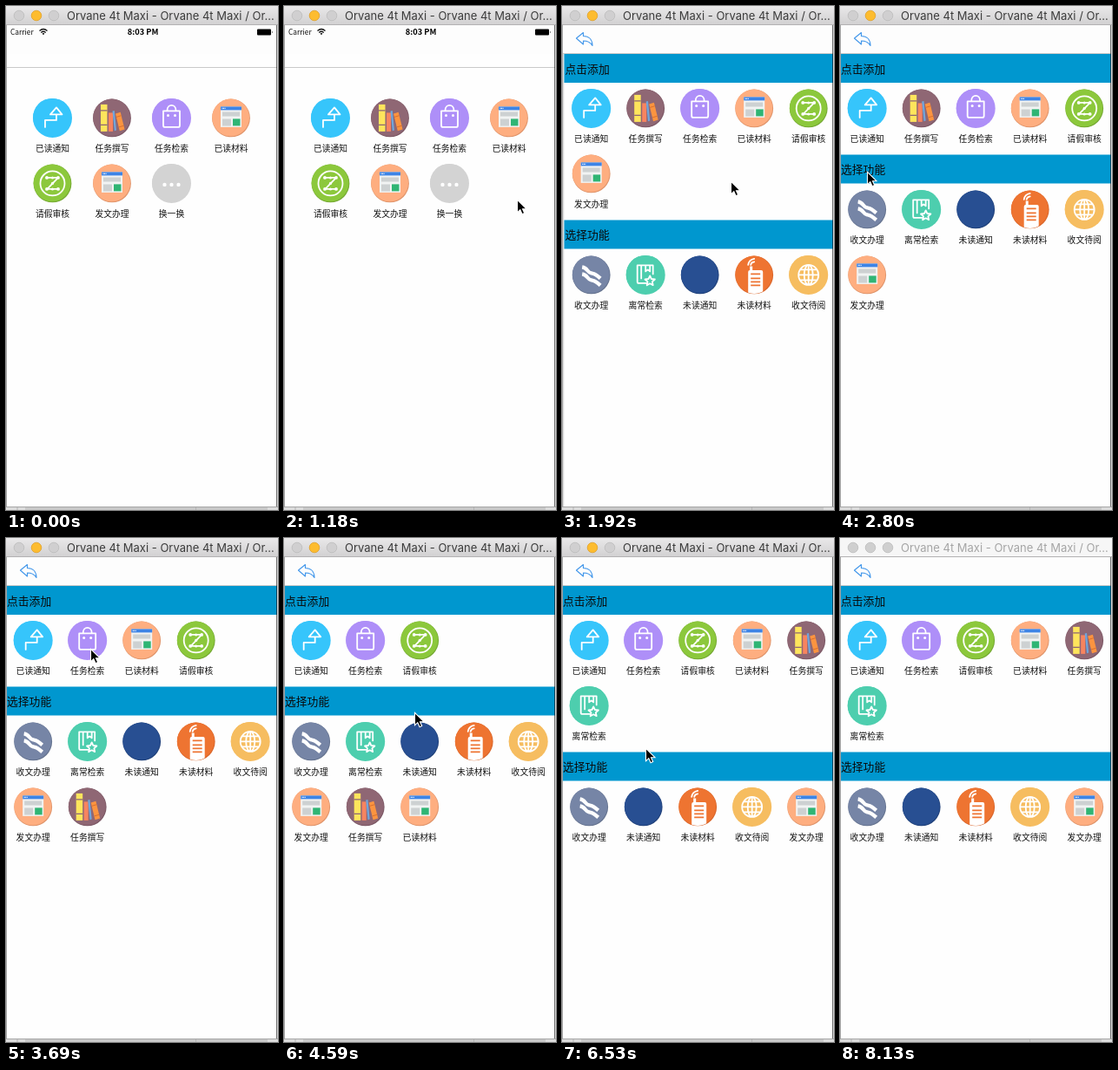
These frames come from a looping animation (313x578 px, 8230 ms). An HTML page:

```html
<!DOCTYPE html>
<html lang="zh">
<head>
<meta charset="utf-8">
<title>Menu editor</title>
<style>
html, body { margin: 0; width: 100%; height: 100%; overflow: hidden; background: #fff; }
svg { display: block; }
text { font-family: "Noto Sans CJK SC", "Noto Sans CJK", sans-serif; }
.ui { font-family: Inter, sans-serif; }
.label { font-size: 9.8px; text-anchor: middle; fill: #111; }
.head { font-size: 12.8px; fill: #0a0a0a; }
.ln { fill: none; stroke: #fff; stroke-width: 1.8; stroke-linejoin: round; stroke-linecap: round; }
.w { fill: #fff; }
</style>
</head>
<body>
<svg width="313" height="578" viewBox="0 0 313 578">
  <defs>
    <linearGradient id="active" x2="0" y2="1"><stop stop-color="#e9e8e9"/><stop offset="1" stop-color="#d1d0d1"/></linearGradient>
    <linearGradient id="edge"><stop stop-color="#000" stop-opacity="0"/><stop offset="1" stop-color="#000" stop-opacity=".16"/></linearGradient>
    <clipPath id="win"><rect x="1" y="22" width="311" height="552"/></clipPath>
    <clipPath id="disc"><circle r="21.500"/></clipPath>

    <g id="arrow"><path class="ln" d="M-8.500 10.500V2.500H4.500V-4H-2.500L4.500-12L11-4H4.500"/></g>
    <g id="books">
      <path d="M-13-15.500h7.500v31h-7.500z" fill="#fee55c"/>
      <path d="M-13-8.500h7.500M-13 8h7.500" stroke="#8c6573" stroke-width="1.400"/>
      <path d="M-4-6h5v21.500h-5z" fill="#f7845f"/>
      <path d="M.5-8l2.300-.5L5 14l-2.200.8z" fill="#6fa5dc"/>
      <path d="M4-5l5.700-1.700L14.500 13l-5.700 1.900z" fill="#fb9440"/>
      <path d="M4.900-1l5.700-1.700M7.900 10.500l5.700-1.700" stroke="#d9702f"/>
    </g>
    <g id="bag">
      <path class="ln" d="M-9.500-8h19v16.500q0 2-2 2h-15q-2 0-2-2zM-5-8.500c0-8 10-8 10 0"/>
      <circle class="w" cx="-4" cy="-3" r="1.500"/><circle class="w" cx="4" cy="-3" r="1.500"/>
    </g>
    <g id="browser">
      <path d="M-12-13h24v23.500h-24z" fill="#f1f3f3"/>
      <path d="M-12-13h24v4h-24z" fill="#3d84e6"/>
      <path d="M-10.500-11h4" stroke="#fff" stroke-width="1.200" stroke-dasharray="1 .6"/>
      <path d="M-10-7h20v5h-20zM-10 1h10v8h-10z" fill="#cdd1d2"/>
      <path d="M2 1h8.500v8h-8.500z" fill="#2fb574"/>
    </g>
    <g id="net">
      <circle class="ln" r="14"/>
      <path class="ln" d="M-7-6.500H6.500L-6 6.500H7"/>
      <g class="w"><circle cx="-6.500" cy="-6.500" r="1.900"/><circle cy="-6.500" r="1.500"/><circle cx="6.500" cy="-6.500" r="1.900"/>
      <circle cx="-6.500" cy="6.500" r="1.900"/><circle cy="6.500" r="1.500"/><circle cx="6.500" cy="6.500" r="1.900"/><circle r="1.600"/></g>
    </g>
    <g id="more" class="w"><circle cx="-8" cy="1.500" r="2.200"/><circle cy="1.500" r="2.200"/><circle cx="8" cy="1.500" r="2.200"/></g>
    <g id="waves" fill="none" stroke="#fff" stroke-width="4.200">
      <path id="wave" d="M-10.500-9C-4-8-5-3 0-2C4-1 5-1 10.500 4"/>
      <use href="#wave" y="8"/>
    </g>
    <g id="mark">
      <path class="ln" d="M1 9.500H-8q-1.500 0-1.500-2V-11H8.500V-1M-5-11V4M0-11V-4L2.500-6L5-4V-11"/>
      <path class="ln" stroke-width="1.500" d="M5 1l1.700 3.600 4 .5-3 2.700.8 4L5 9.900l-3.500 1.900.8-4-3-2.700 4-.5z"/>
    </g>
    <g id="plain"></g>
    <g id="radio" clip-path="url(#disc)">
      <path class="w" d="M-7-3.500q0-2 2-2V-10h3v4.500H8q2 0 2 2V23H-7z"/>
      <path class="ln" stroke-width="1.500" d="M-7-11.500q1-6 7-7M-4-11.500q.5-3 4-3.500"/>
      <path d="M-4-1H7M-4 4H7M-4 8H7M-4 12H7" stroke="#ee7331" stroke-width="1.700"/>
    </g>
    <g id="globe"><path class="ln" stroke-width="1.500" d="M-11.500 0a11.500 11.500 0 1 0 23 0a11.500 11.500 0 1 0-23 0zM-5 0a5 11.500 0 1 0 10 0a5 11.500 0 1 0-10 0zM0-11.500V11.500M-11.500 0H11.500M-9.800-6H9.800M-9.800 6H9.800"/></g>
  </defs>

  <rect width="313" height="578" fill="#dcdcdc"/>
  <rect x="22" y="574" width="279" height="4" fill="#c9c9c9"/>
  <path d="M0 574.500H313" stroke="#a6a6a6"/>
  <path d="M13 575v3M218.500 575v3" stroke="#b4b4b4"/>
  <rect x="1" y="22" width="311" height="552" fill="#fefefe"/>

  <g clip-path="url(#win)">
    <g id="home"></g>
    <g id="edit">
      <rect x="-6" y="55" width="6" height="519" fill="url(#edge)"/>
      <rect y="55" width="314" height="519" fill="#fefefe"/>
      <rect y="55" width="314" height="33" fill="#0097cf"/>
      <text class="head" x="1" y="76.500">点击添加</text>
      <g id="second">
        <rect width="314" height="33" fill="#0097cf"/>
        <text class="head" x="1" y="21.500">选择功能</text>
      </g>
    </g>
    <rect x="1" y="22" width="311" height="33" fill="#fdfdfd"/>
    <path id="rule" d="M1 .5H312" stroke="#c9c9c9"/>
    <path id="back" d="M16.500 37L24.500 30.500V34.500C31 34.500 35 38.500 35 45.500C32.500 41 29.500 40 24.500 40V44Z" fill="none" stroke="#3f95ea" stroke-width="1.100" stroke-linejoin="round"/>
    <g id="status">
      <g class="ui">
        <text x="5" y="33" font-size="8.400" fill="#111">Carrier</text>
        <text x="157.500" y="33" font-size="9.300" font-weight="600" text-anchor="middle">8:03 PM</text>
      </g>
      <path d="M38.500 28.500q4.500-4 9 0M40.300 30.500q2.700-2.400 5.400 0" fill="none" stroke="#111" stroke-width="1.300"/>
      <path d="M41.600 31.600q1.400-1.200 2.800 0L43 33.200z"/>
      <path d="M290 26.500h14q1 0 1 1v5q0 1-1 1h-14q-1 0-1-1v-5q0-1 1-1zM306 28.800q1.500 1.200 0 2.400z"/>
    </g>
    <rect id="dim" y="22" width="313" height="552"/>
  </g>

  <path d="M.5 22V574" stroke="#a2a2a2"/>
  <path d="M311.500 22V574" stroke="#000" stroke-opacity=".58"/>
  <rect id="bar" width="313" height="22"/>
  <path d="M0 21.500H313" stroke="#b3b2b3"/>
  <g stroke-width=".8">
    <circle class="dot" cx="15" cy="11" r="5.800"/>
    <circle class="dot" id="amber" cx="35" cy="11" r="5.800"/>
    <circle class="dot" cx="55" cy="11" r="5.800"/>
  </g>
  <text id="title" class="ui" x="70" y="16" font-size="13">Orvane 4t Maxi - Orvane 4t Maxi / Or...</text>

  <path id="cursor" d="M.5.3V14.800L3.800 11.700L6.100 16.800L8.700 15.600L6.500 10.700H11Z" fill="#000" stroke="#fff" stroke-width="1.100"/>
</svg>
<script>
const LOOP = 8230;
const $ = id => document.getElementById(id);

// key: icon, colour, rim, label
const ITEMS = {
  notice: ['arrow', '#36c5fb', '#36c5fb', '已读通知'],
  write: ['books', '#8f6774', '#7b5764', '任务撰写'],
  search: ['bag', '#ae8ff8', '#ae8ff8', '任务检索'],
  files: ['browser', '#feae80', '#e0946a', '已读材料'],
  leave: ['net', '#8cc83c', '#74a832', '请假审核'],
  send: ['browser', '#feae80', '#e0946a', '发文办理'],
  swap: ['more', '#d3d3d3', '#d3d3d3', '换一换'],
  recv: ['waves', '#7685a6', '#65738f', '收文办理'],
  away: ['mark', '#4dceae', '#4dceae', '离常检索'],
  unread: ['plain', '#284f92', '#20417a', '未读通知'],
  unfile: ['radio', '#ee7431', '#d9652a', '未读材料'],
  wait: ['globe', '#f6bd60', '#f6bd60', '收文待阅']
};

function addItem(parent, key) {
  const [icon, fill, rim, label] = ITEMS[key];
  const r = fill === rim ? 22.5 : 21.9;
  const g = document.createElementNS('http://www.w3.org/2000/svg', 'g');
  g.innerHTML = `<g transform="translate(0 -.6)"><circle r="${r}" fill="${rim}"/>
    <circle cx="-.4" cy="-.5" r="${r - .5}" fill="${fill}"/><use href="#${icon}"/></g>
    <text class="label" y="38">${label}</text>`;
  parent.appendChild(g);
  return g;
}
const move = (el, x, y) => el.setAttribute('transform', `translate(${x} ${y})`);

'notice write search files leave send swap'.split(' ').forEach((key, i) =>
  move(addItem($('home'), key), 53.5 + 68.5 * (i % 4), 129 + 75 * (i >> 2)));

const nodes = {};
for (const key in ITEMS) if (key !== 'swap') nodes[key] = addItem($('edit'), key);

// start time, chosen items, available items
const REST = 'recv away unread unfile wait';
const LISTS = [
  [0, 'notice write search files leave send', REST],
  [2800, 'notice write search files leave', REST + ' send'],
  [3690, 'notice search files leave', REST + ' send write'],
  [4290, 'notice search leave', REST + ' send write files'],
  [5040, 'notice search leave files', REST + ' send write'],
  [5790, 'notice search leave files write', REST + ' send'],
  [6530, 'notice search leave files write away', 'recv unread unfile wait send']
];

// start time, x, y
const POINTER = [
  [0, -50, 0], [750, 291, 231], [1040, 268, 222], [1190, 218, 206], [1330, 194, 201],
  [2210, 165, 198], [2360, 104, 192], [2510, 52, 190], [2650, 31, 190],
  [3090, 38, 181], [3240, 72, 148], [3390, 97, 127],
  [3840, 116, 126], [3990, 147, 126],
  [4440, 148, 145], [4590, 150, 200], [4740, 151, 265], [4890, 151, 304],
  [5340, 140, 306], [5490, 108, 308], [5640, 93, 307],
  [6090, 94, 288], [6240, 95, 256], [6380, 96, 241],
  [6830, 107, 258], [6980, 142, 325], [7130, 190, 415], [7280, 238, 505], [7430, 266, 558], [7580, -50, 0]
];

// start time, x of the pushed page
const PUSH = [[0, 313], [1630, 166], [1780, 24], [1920, 2.5], [2070, 0]];

const at = (track, t) => track.reduce((hit, row) => row[0] <= t ? row : hit);

// Lays out one section and returns the y of its end.
function layout(keys, top) {
  const list = keys.split(' ');
  list.forEach((key, i) => move(nodes[key], 31.2 + 62.5 * (i % 5), top + 30 + 75 * Math.floor(i / 5)));
  return top + 7.5 + 75 * Math.ceil(list.length / 5);
}

let lastList;
function draw(t) {
  const list = at(LISTS, t);
  if (list !== lastList) {
    const y = layout(list[1], 88);
    move($('second'), 0, y);
    layout(list[2], y + 33.5);
    lastList = list;
  }
  const x = at(PUSH, t)[1], done = 1 - x / 313, pushed = t >= 1630;
  move($('home'), -94 * done, 0);
  move($('edit'), pushed ? x : 330, 0);
  move($('rule'), 0, pushed ? 54 : 70);
  $('status').setAttribute('opacity', pushed ? 0 : 1);
  $('back').setAttribute('opacity', done);
  $('dim').setAttribute('opacity', pushed ? .05 * (1 - done) : 0);

  const [, cx, cy] = at(POINTER, t);
  move($('cursor'), cx, cy);

  const on = t < 8130;
  $('bar').setAttribute('fill', on ? 'url(#active)' : '#f6f6f6');
  $('title').setAttribute('fill', on ? '#3c3c3c' : '#a5a5a5');
  document.querySelectorAll('.dot').forEach(d => {
    const amber = on && d.id === 'amber';
    d.setAttribute('fill', amber ? '#fdbc2f' : on ? '#d0cfd0' : '#cfcfcf');
    d.setAttribute('stroke', amber ? '#e0a028' : '#bcbbbc');
  });
}

const start = performance.now();
function tick() {
  draw((performance.now() - start) % LOOP);
  requestAnimationFrame(tick);
}
tick();
</script>
</body>
</html>
```
